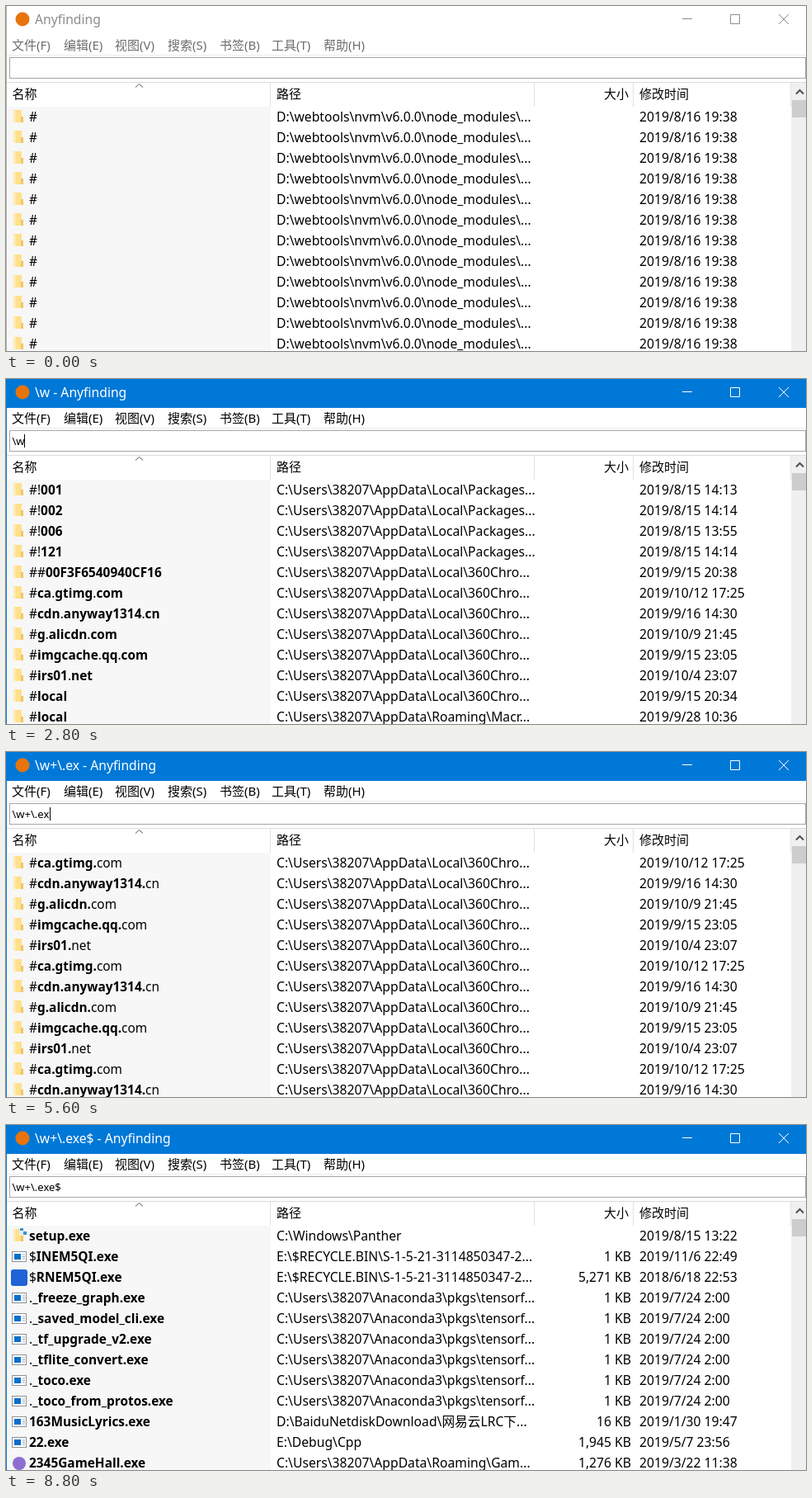
Write an HTML page that moves like this. It is 970 px wide and 418 px high and loops after 9.7 s.

```html
<!DOCTYPE html>
<html lang="zh-CN">
<head>
<meta charset="utf-8">
<title>Anyfinding</title>
<style>
html, body { margin: 0; width: 100%; height: 100%; overflow: hidden; background: #fff; }
svg { display: block; }
text { font: 15.7px "Noto Sans", "Noto Sans CJK SC", "Noto Sans CJK", sans-serif; white-space: pre; }
.name { font-size: 15.4px; }
.bold { font-weight: 700; }
.ui text { font-size: 15px; }
#query { font-size: 13px; }
#buttons, .line { fill: none; }
</style>
</head>
<body>
<svg width="970" height="418" viewBox="0 0 970 418">
  <rect width="970" height="418" fill="#fff"/>
  <rect id="bar" width="970" height="35"/>
  <circle cx="20" cy="16" r="8.5" fill="#e8740c"/>
  <text id="title" x="35" y="22"></text>
  <path id="buttons" d="M820 15.5h12M878.5 10.5h11v11h-11zM937 10l12 12M949 10l-12 12"/>
  <g id="menu" class="ui"></g>
  <path class="line" d="M1 59.5H970" stroke="#ececec"/>
  <rect x="4.5" y="62.5" width="965" height="25" fill="#fff" stroke="#a6a6a6"/>
  <text id="query" x="7.5" y="80"></text>
  <rect id="caret" y="67" width="1" height="16"/>
  <path class="line" d="M1 92.5H970" stroke="#dcdcdc"/>
  <rect x="1" y="122" width="320" height="296" fill="#f7f7f7"/>
  <path class="line" d="M320.5 93v29M640.5 93v29M760.5 93v29M951.5 93v29" stroke="#e2e2e2"/>
  <path class="line" d="M157 98.5l4.5-4 4.5 4" stroke="#555"/>
  <g class="ui">
    <text x="7.5" y="112">名称</text>
    <text x="328" y="112">路径</text>
    <text x="755" y="112" text-anchor="end">大小</text>
    <text x="768" y="112">修改时间</text>
  </g>
  <g id="list"></g>
  <g id="scroll">
    <rect x="952" y="93" width="18" height="325" fill="#f0f0f0"/>
    <path class="line" d="M958 106.5l4.5-4.5 4.5 4.5" stroke="#505050" stroke-width="2"/>
    <rect x="953" y="114" width="17" height="21" fill="#cdcdcd"/>
  </g>
  <rect id="edge" width="1" height="418"/>
</svg>
<script>
const $ = id => document.getElementById(id);
const APP = 'Anyfinding', LOOP = 9700;
const HOME = 'C:/Users/38207/';
const slashes = s => s.replaceAll('/', '\\');

// rows: icon | name | path | size | date
const nvm = Array(12).fill('d|#|D:/webtools/nvm/v6.0.0/node_modules/...||2019/8/16 19:38');

const word = [
  ['#!001', '8/15 14:13'], ['#!002', '8/15 14:14'], ['#!006', '8/15 13:55'], ['#!121', '8/15 14:14'],
  ['##00F3F6540940CF16', '9/15 20:38'], ['#ca.gtimg.com', '10/12 17:25'],
  ['#cdn.anyway1314.cn', '9/16 14:30'], ['#g.alicdn.com', '10/9 21:45'],
  ['#imgcache.qq.com', '9/15 23:05'], ['#irs01.net', '10/4 23:07'],
  ['#local', '9/15 20:34'], ['#local', '9/28 10:36']
].map(([name, date], i) => {
  const dir = i < 4 ? 'Local/Packages...' : i < 11 ? 'Local/360Chro...' : 'Roaming/Macr...';
  return `d|${name}|${HOME}AppData/${dir}||2019/${date}`;
});

const dotted = word.filter(r => /#\w+\./.test(r));
const dots = Array.from({ length: 12 }, (_, i) => dotted[i % dotted.length]);

const web = 'web.extensions...';
const sxs = [
  ['35linq', 'web.exten...', '8/16 0:39'], ['35linq', 'web.exten...', '8/16 0:39'],
  ['4', 'globalization.e...', '3/19 12:46'], ['4', 'linq.expression...', '3/19 12:46'],
  ['4', 'reflection.exte...', '3/19 12:46'], ['4', 'runtime.extens...', '3/19 12:46'],
  ['4', 'text.encoding....', '3/19 12:46'], ['4', web, '3/19 12:46'], ['4', web, '3/19 19:42'],
  ['4', web, '3/19 12:46'], ['4', web, '10/3 21:15'], ['4', web, '9/1 12:03']
].map(([ver, tail, date], i) =>
  `d|amd64_netfx${ver}-system.${tail}|C:/Windows/WinSxS${i === 10 ? '/Temp/InFlight/c26e...' : ''}||2019/${date}`);

const report = (name, date) => `f|${name}|C:/ProgramData/Microsoft/Windows/WE...||2019/10/${date}`;
const conda = name => `x|._${name}.exe|${HOME}Anaconda3/pkgs/tensorf...|1 KB|2019/7/24 2:00`;
const bin = 'E:/$RECYCLE.BIN/S-1-5-21-3114850347-2...';
const exe = [
  report('AppCrash_javaw.exe_63981db7d62e...', '31 21:46'),
  report('AppCrash_QQ.exe_9784db531e4f1f4...', '26 20:12'),
  report('AppHang_explorer.exe_5daf61d1c5e...', '19 10:09'),
  report('AppHang_explorer.exe_e41e92222cc...', '29 12:27'),
  report('AppHang_java.exe_4ea5fddf2717acf...', '18 22:08'),
  `d|http.request.execution.environment|${HOME}.WebStorm2019.2/syste...||2019/11/4 21:22`,
  'f|setup.exe|C:/Windows/Panther||2019/8/15 13:22',
  `x|$INEM5QI.exe|${bin}|1 KB|2019/11/6 22:49`,
  `b|$RNEM5QI.exe|${bin}|5,271 KB|2018/6/18 22:53`,
  ...['freeze_graph', 'saved_model_cli', 'tf_upgrade_v2', 'tflite_convert', 'toco', 'toco_from_protos'].map(conda),
  'x|163MusicLyrics.exe|D:/BaiduNetdiskDownload/网易云LRC下...|16 KB|2019/1/30 19:47',
  'x|22.exe|E:/Debug/Cpp|1,945 KB|2019/5/7 23:56',
  `g|2345GameHall.exe|${HOME}AppData/Roaming/Gam...|1,276 KB|2019/3/22 11:38`
];

const folder = '<path d="M9 3h10v15H9z" fill="#ffe08c"/><path d="M9 3l3 1v14H9z" fill="#ffebb0"/>' +
  '<path d="M18 11h3v7h-3z" fill="#efc765"/>';
const icons = {
  d: folder,
  f: folder + '<path d="M16 2h5v8h-5z" fill="#e4edf5"/><path d="M17 2h4v3h-4zM21 6h4v4h-4z" fill="#3c8fd0"/>',
  x: '<rect x="7.5" y="5.5" width="17" height="12" fill="#fff" stroke="#8b939b"/>' +
     '<path d="M10 8h8v7h-8z" fill="#0b6fcb"/><path d="M20 9h3M20 11.5h3M20 14h3" stroke="#9aa5ae"/>',
  b: '<rect x="6" y="2" width="20" height="20" rx="3" fill="#1f63d6"/>',
  g: '<circle cx="16" cy="12" r="8" fill="#8d6fd0"/>'
};

const mark = (name, re) => re ? name.replace(re, m => `<tspan class="bold">${m}</tspan>`) : name;

function rowsMarkup(rows, re) {
  return rows.map((row, i) => {
    const [icon, name, path, size, date] = row.split('|');
    return `<g transform="translate(0 ${123 + 25 * i})">${icons[icon]}
      <text class="name" x="28" y="17">${mark(name, re)}</text><text x="328" y="17">${slashes(path)}</text>
      <text x="758" y="17" text-anchor="end">${size}</text><text x="768" y="17">${date}</text></g>`;
  }).join('');
}

const exeRe = /\w+\.exe/g;
const lists = {
  none: '',
  nvm: rowsMarkup(nvm),
  word: rowsMarkup(word, /\w+/g),
  first: rowsMarkup(dots.slice(0, 1), /\w+\./g),
  dots: rowsMarkup(dots, /\w+\./g),
  sxs: rowsMarkup(sxs, /\w+\.(ex|e?\.\.\.)/g),
  exe: rowsMarkup(exe.slice(0, 12), exeRe),
  end: rowsMarkup(exe.slice(6), exeRe)
};

// start time, typed text, list, caret
const steps = [
  [0, '', 'nvm', 0], [800, '', 'nvm', 1], [1400, '', 'nvm', 0], [1800, '', 'nvm', 1],
  [2300, '/', 'none', 1], [2700, '/w', 'none', 1], [2800, '/w', 'word', 1], [3200, '/w', 'word', 0],
  [3600, '/w+', 'word', 1], [4100, '/w+', 'word', 0],
  [4200, '/w+/', 'none', 1], [4700, '/w+/', 'none', 0],
  [4900, '/w+/.', 'none', 1], [5100, '/w+/.', 'first', 1], [5200, '/w+/.', 'dots', 1],
  [5300, '/w+/.e', 'dots', 1], [5600, '/w+/.ex', 'dots', 1], [5700, '/w+/.ex', 'sxs', 1],
  [5800, '/w+/.exe', 'sxs', 1], [6300, '/w+/.exe', 'sxs', 0],
  [6500, '/w+/.exe', 'exe', 0], [6800, '/w+/.exe', 'exe', 1],
  [7300, '/w+/.exe$', 'exe', 1], [7800, '/w+/.exe$', 'exe', 0],
  [8000, '/w+/.exe$', 'end', 0], [8300, '/w+/.exe$', 'end', 1], [8800, '/w+/.exe$', 'end', 0]
];
const caretX = [7, 12, 22, 30, 35, 39, 46, 53, 59, 66];

$('menu').innerHTML = ['文件(F)', '编辑(E)', '视图(V)', '搜索(S)', '书签(B)', '工具(T)', '帮助(H)']
  .map((s, i) => `<text x="${[7, 70, 132, 196, 259, 322, 385][i]}" y="53">${s}</text>`).join('');

let shown = null, shownList = null;

function draw(time) {
  const step = steps.findLast(s => s[0] <= time);
  if (step === shown) return;
  shown = step;
  const [start, typed, list, caret] = step;
  const active = start >= 800, query = slashes(typed);
  $('bar').setAttribute('fill', active ? '#0078d7' : '#fff');
  $('edge').setAttribute('fill', active ? '#0078d7' : '#b4b4b4');
  $('title').setAttribute('fill', active ? '#fff' : '#8c8c8c');
  $('buttons').setAttribute('stroke', active ? '#fff' : '#8c8c8c');
  $('menu').setAttribute('fill', active ? '#000' : '#6d6d6d');
  $('title').textContent = query ? `${query} - ${APP}` : APP;
  $('query').textContent = query;
  $('caret').setAttribute('x', caretX[query.length]);
  $('caret').setAttribute('visibility', caret ? 'visible' : 'hidden');
  $('scroll').setAttribute('visibility', list === 'none' ? 'hidden' : 'visible');
  if (list !== shownList) $('list').innerHTML = lists[shownList = list];
}

const begin = performance.now();
function tick() {
  draw((performance.now() - begin) % LOOP);
  requestAnimationFrame(tick);
}
tick();
</script>
</body>
</html>
```
